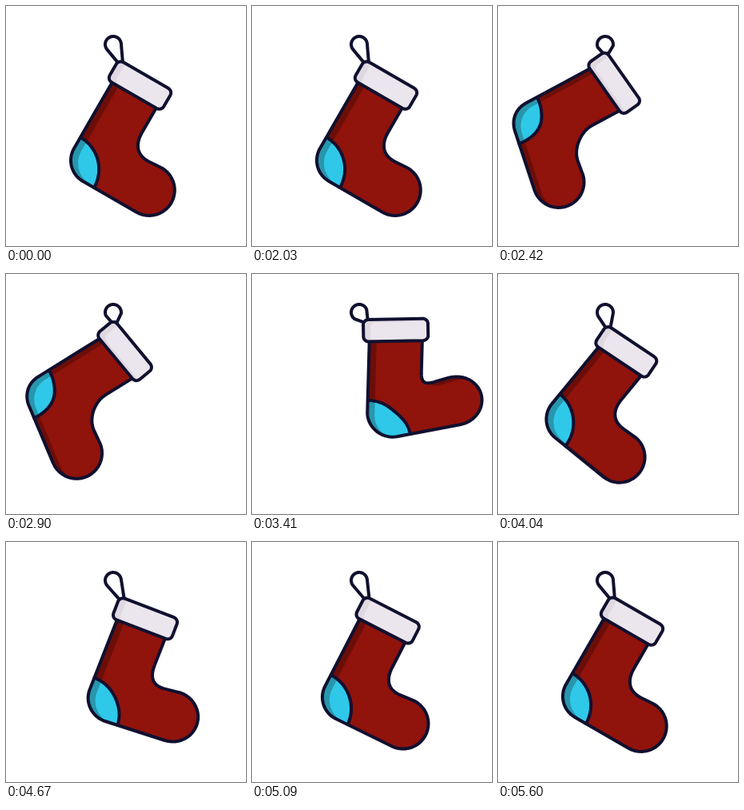
Recreate the animation shown at these times as an HTML page with a canvas. Size 300 by 300 pixels, loop 5.66 s.

```html
<!DOCTYPE html>
<html>
<head>
<meta charset="utf-8">
<title>Swinging stocking</title>
<style>
  html, body { margin: 0; width: 100%; height: 100%; overflow: hidden; background: #fff; }
  canvas { display: block; }
</style>
</head>
<body>
<canvas id="stage" width="300" height="300"></canvas>
<script>
const ctx = document.getElementById('stage').getContext('2d');
const LOOP = 5660, STEP = 30, REST_ANGLE = 30;
const INK = '#10102f', SHADE_X = 9, SHADE_Y = 3.4;
const RING = { x: 134, y: 48, r: 10 };

// Swing turning points: [ms, degrees]
const SWING = [[0, 0], [2000, 0], [2620, 44], [3470, -30], [4170, 14.3], [4770, -11], [5300, 2.7], [5600, 0], [LOOP, 0]];

// Flexing by swing: [swing, cuff corner x, y, cuff turn, foot bend]
const POSES = [
  [-30, 142, 57.5, -33, -13],
  [-9.5, 145, 71, -10, -4],
  [0, 143, 70, 0, 0],
  [10, 137.5, 66.5, 4, -0.5],
  [27, 136, 61, 19, 8.5],
  [44, 133, 56, 40, 14],
];

// Row of numbers at key x; shape eases the fraction
function sample(rows, x, shape = k => k) {
  let i = 1;
  while (i < rows.length - 1 && x > rows[i][0]) i++;
  const a = rows[i - 1], b = rows[i];
  const k = shape((x - a[0]) / (b[0] - a[0]));
  return a.map((v, n) => v + (b[n] - v) * k).slice(1);
}

const sineEase = k => (1 - Math.cos(Math.PI * k)) / 2;

function turn(x, y, degrees) {
  const a = degrees * Math.PI / 180, c = Math.cos(a), s = Math.sin(a);
  return [x * c - y * s, x * s + y * c];
}

function arc(cx, cy, r, from, to, n = 24) {
  return Array.from({ length: n + 1 }, (_, i) => {
    const a = from + (to - from) * i / n;
    return [cx + r * Math.cos(a), cy + r * Math.sin(a)];
  });
}

function bezier(p, n = 16) {
  return Array.from({ length: n + 1 }, (_, i) => {
    const t = i / n, u = 1 - t;
    return [0, 1].map(d => u ** 3 * p[0][d] + 3 * u * u * t * p[1][d] + 3 * u * t * t * p[2][d] + t ** 3 * p[3][d]);
  });
}

// Upright outlines, measured from the cuff's upper left corner
const { PI } = Math;
const BODY = [
  [3.8, 15], [3.8, 66],
  ...arc(33.8, 122.5, 30, PI, PI / 2),
  ...arc(111.3, 120.7, 31.8, PI / 2, -1.7),
  ...bezier([[93, 90], [77, 91], [67.5, 81], [67.5, 63]]),
  [67.5, 15],
];
const HEEL = arc(4, 152.5, 46, -PI / 2, 0);
const CUFF = [
  ...arc(3.3, 5, 6.5, -PI, -PI / 2, 8),
  ...arc(68.3, 5, 6.5, -PI / 2, 0, 8),
  ...arc(68.3, 21, 6.5, 0, PI / 2, 8),
  ...arc(3.3, 21, 6.5, PI / 2, PI, 8),
];

function trace(points, closed = true) {
  const path = new Path2D();
  points.forEach(([x, y]) => path.lineTo(x, y));
  if (closed) path.closePath();
  return path;
}

// Fill with the shade colour, then the same outline shifted in the light colour
function fillShaded(area, outline, dark, light) {
  ctx.save();
  ctx.clip(area);
  ctx.fillStyle = dark;
  ctx.fill(area);
  ctx.translate(SHADE_X, SHADE_Y);
  ctx.fillStyle = light;
  ctx.fill(outline);
  ctx.restore();
}

function draw(time) {
  const [swing] = sample(SWING, time, sineEase);
  const [ox, oy, cuffTurn, bend] = sample(POSES, swing);
  const sx = 1 + Math.max(0, -swing) * 0.0013, sy = 1 - Math.max(0, -swing) * 0.0018;

  const onCuff = ([u, v]) => {
    const [x, y] = turn(u * sx, v * sy, REST_ANGLE + cuffTurn);
    return [ox + x, oy + y];
  };
  const [legX, legY] = onCuff([37, 28]);
  const onLeg = ([u, v]) => {
    const k = Math.min(1, Math.max(0, (u + v - 130) / 60));
    const [fx, fy] = turn((u - 40) * sx, (v - 120) * sy, bend * k * k * (3 - 2 * k));
    const [x, y] = turn(fx + 3 * sx, fy + 92 * sy, REST_ANGLE + swing);
    return [legX + x, legY + y];
  };

  ctx.clearRect(0, 0, 300, 300);
  ctx.strokeStyle = INK;
  ctx.lineWidth = 4;
  ctx.lineJoin = ctx.lineCap = 'round';

  const body = trace(BODY.map(onLeg));
  const heelEdge = HEEL.map(onLeg);
  const heel = trace([...heelEdge, onLeg([-8, 165])]);
  fillShaded(body, body, '#6c0e08', '#90130c');
  ctx.save();
  ctx.clip(body);
  fillShaded(heel, body, '#2896ac', '#2fc8e9');
  ctx.restore();
  ctx.stroke(trace(heelEdge, false));
  ctx.stroke(body);

  const toCuff = Math.atan2(oy - RING.y, ox - RING.x);
  const nx = -Math.sin(toCuff) * 3, ny = Math.cos(toCuff) * 3;
  ctx.stroke(trace([
    [ox + nx, oy + ny],
    ...arc(RING.x, RING.y, RING.r, toCuff + 1.3, toCuff + 2 * PI - 1.3),
    [ox - nx, oy - ny],
  ]));

  const cuff = trace(CUFF.map(onCuff));
  fillShaded(cuff, cuff, '#dfd8e1', '#ebe6ed');
  ctx.stroke(cuff);
}

function tick() {
  const time = performance.now() % LOOP;
  draw(Math.floor(time / STEP) * STEP);
  requestAnimationFrame(tick);
}
tick();
</script>
</body>
</html>
```
